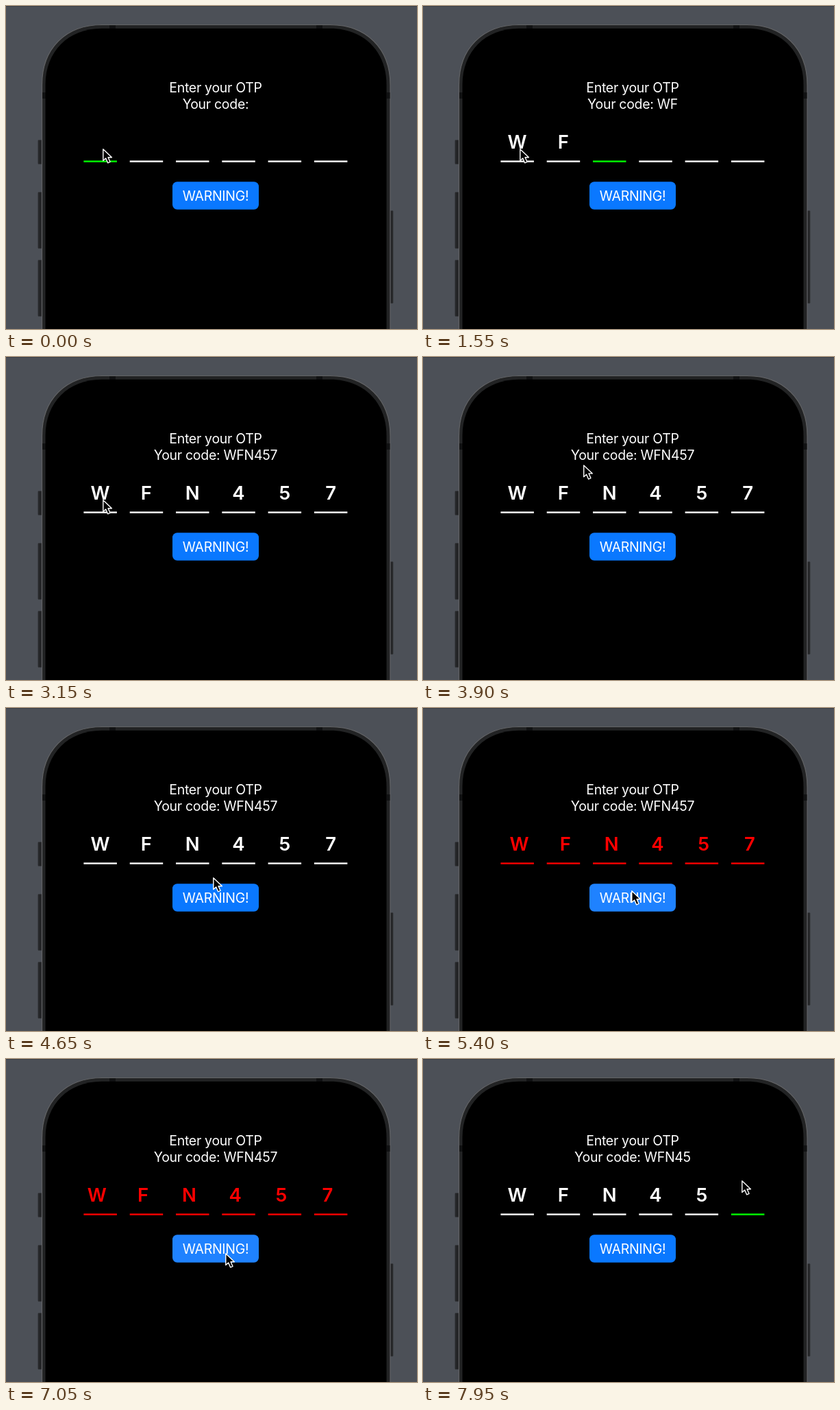
An HTML page that plays this animation: 600 px wide and 471 px high, repeating every 8 s.

```html
<!DOCTYPE html>
<html lang="en">
<head>
<meta charset="utf-8">
<title>Code entry</title>
<style>
html, body { margin: 0; width: 100%; height: 100%; overflow: hidden; background: #4c5057; }
svg { display: block; width: 600px; height: 471px; }
text { font-family: Inter, "Open Sans", sans-serif; fill: #fff; text-anchor: middle; }
.body { font-size: 19.5px; letter-spacing: -0.3px; }
.digit { font-size: 27.5px; font-weight: 600; }
</style>
</head>
<body>
<svg viewBox="0 0 600 471">
  <rect width="600" height="471" fill="#4c5057"/>
  <rect width="600" height="1" fill="#3b3f45"/>
  <g fill="#242527" stroke="#36383b" stroke-width=".8">
    <rect x="46.9" y="195.5" width="7" height="35" rx="1"/>
    <rect x="46.9" y="271.5" width="7" height="82" rx="1"/>
    <rect x="46.9" y="370.5" width="7" height="82" rx="1"/>
    <rect x="558" y="298.5" width="7" height="135" rx="1"/>
  </g>
  <path d="M52.5 480V115C52.5 62 87 27.5 140 27.5H473C526 27.5 561 62 561 115V480Z" fill="#222324" stroke="#626365" stroke-width="1.2"/>
  <g fill="#111213">
    <rect x="151" y="28" width="9" height="5"/>
    <rect x="453" y="28" width="9" height="5"/>
    <rect x="53" y="126" width="5" height="9"/>
    <rect x="555.5" y="126" width="5" height="9"/>
  </g>
  <path d="M57.5 480V115C57.5 66 91 32.8 140 32.8H473C522 32.8 555.5 66 555.5 115V480Z"/>
  <text class="body" x="306" y="125.5">Enter your OTP</text>
  <text class="body" id="code" x="306" y="149.5"></text>
  <g id="fields"></g>
  <rect id="button" x="243" y="256.3" width="126" height="40.4" rx="7"/>
  <text class="body" x="306" y="284">WARNING!</text>
  <path id="cursor" d="M.8 .8V17.6L4.7 14L7.6 20.8L11 19.3L8.1 12.7H13.4Z" fill="#000" stroke="#fff" stroke-width="1.4" stroke-linejoin="round"/>
</svg>
<script>
const LOOP = 8000, STEP = 50, SHAKE = 500, PRESS = 250;
const $ = id => document.getElementById(id);

// [time, text, focused field]
const typing = [
  [0, "", 0], [1000, "W", 1], [1400, "WF", 2], [1850, "WFN", 3],
  [2250, "WFN4", 4], [2650, "WFN45", 5], [3000, "WFN457", -1],
  [7650, "WFN457", 5], [7850, "WFN45", 5]
];
// [time, x, y]
const path = [
  [0, 141, 208], [3450, 141, 208], [3800, 215, 165], [4100, 288, 135],
  [4250, 300, 152], [4600, 302, 247], [4700, 302, 247], [5000, 304, 266],
  [5950, 304, 266], [6200, 316, 320], [6300, 318, 320], [6500, 320, 283],
  [7100, 320, 283], [7550, 465, 177], [8000, 465, 177]
];
const warnings = [5300, 6850];

const fields = Array.from({ length: 6 }, (_, i) => {
  const x = 113.4 + 67.3 * i;
  const add = (tag, attrs) => {
    const el = document.createElementNS("http://www.w3.org/2000/svg", tag);
    for (const key in attrs) el.setAttribute(key, attrs[key]);
    return $("fields").appendChild(el);
  };
  return {
    x: x + 24.2,
    line: add("rect", { x, y: 225.4, width: 48.5, height: 2.4 }),
    digit: add("text", { class: "digit", y: 207.5 })
  };
});

const ease = p => p * p * (3 - 2 * p);

function cursorAt(t) {
  const n = path.findIndex(p => p[0] > t);
  const a = path[n - 1], b = path[n];
  const p = ease((t - a[0]) / (b[0] - a[0]));
  return [a[1] + (b[1] - a[1]) * p, a[2] + (b[2] - a[2]) * p];
}

function draw(t) {
  const [, text, focus] = typing.filter(s => s[0] <= t).pop();
  const start = warnings.find(w => t >= w && t < w + SHAKE);
  const warn = start !== undefined;
  const shift = warn ? 5 * Math.sin(4 * Math.PI * (t - start) / SHAKE) : 0;
  const pressed = warnings.some(w => t >= w - 50 && t < w + PRESS);

  $("code").textContent = ("Your code: " + text).trim();
  fields.forEach(({ x, line, digit }, i) => {
    digit.textContent = text[i] || "";
    digit.setAttribute("x", x + shift);
    digit.style.fill = warn ? "#f00" : "#fff";
    line.setAttribute("fill", warn ? "#f00" : i === focus ? "#0f0" : "#fff");
  });
  $("button").setAttribute("fill", pressed ? "#1f82ff" : "#0a78ff");
  $("cursor").setAttribute("transform", `translate(${cursorAt(t)})`);
}

function frame() {
  const t = performance.now() % LOOP;
  draw(Math.floor(t / STEP) * STEP);
  requestAnimationFrame(frame);
}
frame();
</script>
</body>
</html>
```
